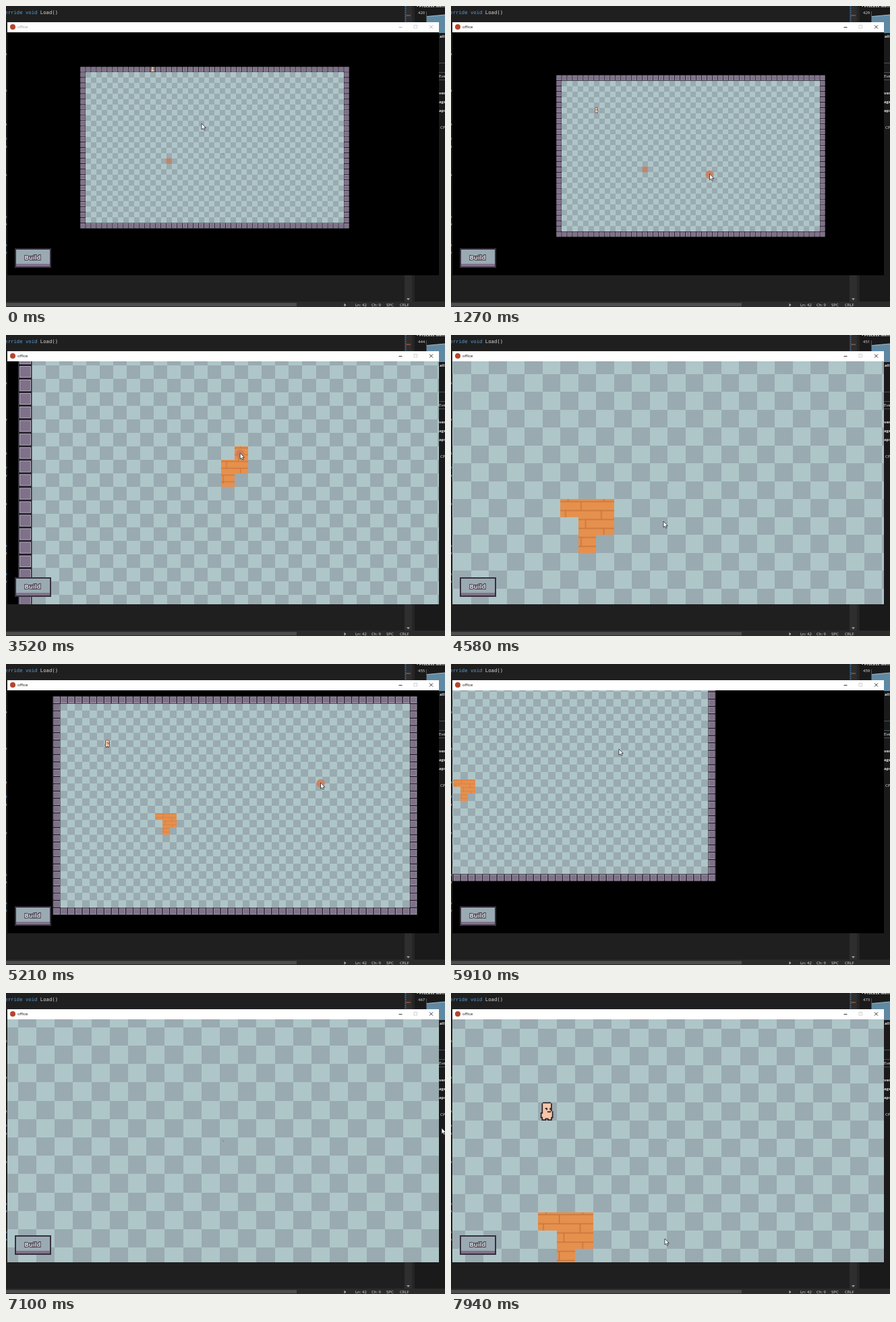
Recreate the animation shown at these times as an HTML page. Size 651 by 446 pixels, loop 8000 ms.

```html
<!DOCTYPE html>
<html lang="en">
<head>
<meta charset="utf-8">
<title>office</title>
<style>
  html, body { margin: 0; width: 100%; height: 100%; overflow: hidden; background: #1f1f1f; }
  svg { display: block; width: 651px; height: 446px; }
  text { font-family: "Open Sans", "Noto Sans", sans-serif; font-size: 6px; fill: #e4e4e4; }
  .code { font-family: "DejaVu Sans Mono", monospace; font-size: 7.27px; fill: #d8d8d8; white-space: pre; }
  .bold { font-weight: 700; }
  .build { font-size: 9.4px; font-weight: 700; fill: #dde1e4; stroke: #403a48; stroke-width: 2px; paint-order: stroke; text-anchor: middle; }
</style>
</head>
<body>
<svg viewBox="0 0 651 446" xmlns="http://www.w3.org/2000/svg">
  <defs>
    <clipPath id="view"><rect x="2" y="39" width="640" height="360"/></clipPath>
    <pattern id="planks" width="2" height="2" patternUnits="userSpaceOnUse">
      <rect width="2" height="2" fill="#e6904e"/>
      <path d="M0 .13H2M0 .63H2M0 1.13H2M0 1.63H2M.42 0V.13M.42 1.63V2M1.15 .13V.63M.28 .63V1.13M1.4 1.13V1.63"
            stroke="#c9743a" stroke-width=".055" fill="none"/>
    </pattern>
  </defs>

  <!-- editor behind the window -->
  <rect width="651" height="446" fill="#1f1f1f"/>
  <text class="code" x="-1.7" y="12"><tspan fill="#569cd6">erride void</tspan> Load()</text>
  <path d="M.7 70v3M.7 124v3M.7 174v3M.7 207v3M.7 249v3M.7 322v3" stroke="#8a8a8a"/>
  <path d="M.7 195v3M.7 311v3M.7 353v3M.7 364v3" stroke="#4a80ad"/>
  <rect x="591" width="11" height="438" fill="#2e2e2e"/>
  <path d="M592.500 0V24" stroke="#3c6287" stroke-width="2" stroke-dasharray="2 1"/>
  <rect x="593" y="13" width="7" height="2" fill="#7a4b36"/>
  <path d="M594 433h5l-2.500 3z" fill="#a0a0a0"/>
  <rect x="602" width="4" height="438" fill="#252526"/>
  <rect x="606" width="45" height="438" fill="#1a1a1b"/>
  <rect y="438" width="651" height="8" fill="#2b2b2b"/>
  <rect y="440" width="431" height="5" fill="#4d4d4d"/>
  <path d="M501.500 440.500v5l3-2.500z" fill="#b0b0b0"/>
  <text x="518" y="445">Ln: 42</text>
  <text x="542" y="445">Ch: 9</text>
  <text x="564" y="445">SPC</text>
  <text x="584" y="445">CRLF</text>

  <!-- memory panel -->
  <text class="bold" x="609" y="2">▪ Process Memory</text>
  <text id="mem" x="611" y="12"></text>
  <path d="M624 15.500L651 13V40H624Z" fill="#5f89a3"/>
  <path d="M624 15.500L651 13" stroke="#c3d3dc" stroke-width=".8"/>
  <path d="M623.500 8V40" stroke="#777" stroke-width=".6"/>
  <path d="M642 84.500h9M642 98.500h9M642 109.500h9" stroke="#51636f" stroke-width=".8"/>
  <text class="bold" x="643" y="47">all</text>
  <text x="642" y="106" fill="#aaa">Eve</text>
  <text class="bold" x="642" y="131">ver</text>
  <text class="bold" x="642" y="144">age</text>
  <text class="bold" x="642" y="157">aps</text>
  <text x="644" y="182">CP</text>

  <!-- game window -->
  <rect x="2" y="24" width="640" height="15" fill="#fff"/>
  <circle cx="10" cy="31" r="4" fill="#b5452c"/>
  <text id="title" x="17" y="33">office</text>
  <path id="buttons" d="M582.500 31.500h5M628 28.500l5 5m0-5l-5 5" fill="none" stroke-width=".9"/>
  <rect x="605" y="28.500" width="4.500" height="4.500" fill="none" stroke="#c8c8c8" stroke-width=".8"/>
  <rect x="2" y="39" width="640" height="360" fill="#000"/>
  <g clip-path="url(#view)">
    <g id="world">
      <rect width="50" height="30" fill="#aec6c8"/>
      <path id="dark" fill="#9aaab1" shape-rendering="crispEdges"/>
      <path id="wallBase" fill="#211b27"/>
      <path id="wallRim" fill="#b3aebb"/>
      <path id="wallFace" fill="#80718a"/>
      <path id="wood" fill="url(#planks)" shape-rendering="crispEdges"/>
      <rect id="muted" x="16" y="17" width="1" height="1" fill="#c0866b"/>
      <g id="person">
        <path d="M4 0H11V1H12V8H13V14H12V16H8V15H7V16H3V14H2V9H3V1H4Z" fill="#2c2427"/>
        <path d="M4 1H11V8H12V13H11V15H9V14H6V15H4V13H3V10H4Z" fill="#f6c5a9"/>
        <path d="M6 5H8V7H7V6H6ZM10 5H11V7H10ZM8 8H11V9H8Z" fill="#2c2427"/>
      </g>
    </g>
    <circle cx="322" cy="219" r=".8" fill="#6b7378"/>
    <rect x="14" y="360" width="52" height="27" fill="#9aaab2" stroke="#37303f" stroke-width="2"/>
    <rect x="15" y="382" width="50" height="4" fill="#80718a"/>
    <text class="build" x="39.500" y="376">Build</text>
  </g>

  <circle id="press" r="6.300" fill="#cf7b58" opacity=".85"/>
  <path id="cursor" d="M0 0V9L2.100 7.200L3.600 10.200L5.100 9.500L3.700 6.600H6.400Z" fill="#fff" stroke="#22262a" stroke-width=".8"/>
</svg>
<script>
const LOOP = 8000, COLS = 50, ROWS = 30, MID_X = 322, MID_Y = 219, ZOOM_TIME = 140;
const $ = id => document.getElementById(id);
const show = (id, on) => $(id).style.display = on ? "" : "none";
const place = (id, x, y, scale = 1) =>
  $(id).setAttribute("transform", `translate(${x} ${y}) scale(${scale})`);

// Tiles laid one after another; the first is there from the start.
const tiles = [[16, 17], [15, 18], [15, 17], [16, 16], [15, 16], [14, 16]];
const laidAt = i => i ? 2900 + 200 * i : 0;

// Each drag moves the pointer from one point to another and the map with it.
const drags = [
  { from: 560, to: 2080, path: [[337.5, 236], [360, 274], [387, 245], [406, 251], [428.7, 215.8]] },
  { from: 4020, to: 4400, path: [[412.8, 203.4], [315, 276]] },
  { from: 5100, to: 5880, path: [[502.6, 184.1], [249, 126]] },
  { from: 6450, to: 7040, path: [[249, 126], [638.5, 215.2]] },
  { from: 7400, to: 7920, path: [[96.7, 226], [317, 364]] }
];
const zooms = [[2180, 20.05], [4400, 26.5], [4720, 10.8], [6060, 27.2]];
const walk = [[70, 13, 0], [320, 10.1, 3], [520, 10.1, 3], [1270, 7, 6], [7150, 7, 6], [7900, 14, 10]];

function at(keys, t) {
  const i = keys.findIndex(k => k[0] > t);
  if (i === 0) return keys[0].slice(1);
  if (i < 0) return keys[keys.length - 1].slice(1);
  const a = keys[i - 1], b = keys[i], p = (t - a[0]) / (b[0] - a[0]);
  return a.slice(1).map((v, j) => v + (b[j + 1] - v) * p);
}

const zoomAt = t => zooms.reduce((size, [start, next]) => {
  const p = Math.min(1, Math.max(0, (t - start) / ZOOM_TIME));
  return size * (next / size) ** p;
}, 7.98);

function cameraAt(t) {
  let x = 26.57, y = 16.17;
  for (const { from, to } of drags) {
    if (t < from) break;
    const [x0, y0] = at(pointer, from), [x1, y1] = at(pointer, Math.min(t, to));
    const size = zoomAt(from);
    x -= (x1 - x0) / size;
    y -= (y1 - y0) / size;
  }
  return [x, y, zoomAt(t)];
}

// The pointer rests, drags, or visits the middle of each tile being laid.
const pointer = [
  [70, 290, 174], [320, 325, 252], [520, 325, 252], [2310, 326, 218], [3030, 326, 218],
  [4720, 315, 276], [7100, 646, 200], [7200, 646, 200]
];
for (const { from, to, path } of drags)
  path.forEach((p, i) => pointer.push([from + (to - from) * i / (path.length - 1), ...p]));
pointer.sort((a, b) => a[0] - b[0]);
const [buildX, buildY, buildSize] = cameraAt(3030);
tiles.slice(1).forEach(([col, row], i) => pointer.push([
  laidAt(i + 1),
  MID_X + (col + 0.5 - buildX) * buildSize,
  MID_Y + (row + 0.5 - buildY) * buildSize
]));
pointer.sort((a, b) => a[0] - b[0]);

const box = (x, y, inset = 0) => {
  const s = 1 - 2 * inset;
  return `M${x + inset} ${y + inset}h${s}v${s}h${-s}z`;
};

function buildRoom() {
  const d = { dark: "", wallBase: "", wallRim: "", wallFace: "" };
  for (let y = 0; y < ROWS; y++) for (let x = 0; x < COLS; x++) {
    if (x % (COLS - 1) && y % (ROWS - 1)) {
      if ((x + y) % 2 === 0) d.dark += box(x, y);
    } else {
      d.wallBase += box(x, y);
      d.wallRim += box(x, y, 0.07);
      d.wallFace += box(x, y, 0.12);
    }
  }
  for (const id in d) $(id).setAttribute("d", d[id]);
}

function draw(t) {
  const [cx, cy, size] = cameraAt(t);
  place("world", MID_X - cx * size, MID_Y - cy * size, size);
  place("person", ...at(walk, t), 1 / 16);

  $("wood").setAttribute("d", tiles.filter((_, i) => t >= laidAt(i)).map(p => box(...p)).join(""));
  show("muted", size < 8);

  const [px, py] = at(pointer, t);
  place("cursor", px, py);
  place("press", px, py + 1);
  const building = t >= laidAt(1) && t < laidAt(tiles.length - 1);
  show("press", building || drags.some(d => t >= d.from && t < d.to));

  const active = t >= drags[0].from;
  $("title").style.fill = active ? "#111" : "#999";
  $("buttons").style.stroke = active ? "#222" : "#aaa";
  $("mem").textContent = Math.floor(420.9 + t * 0.00658);
}

function tick() {
  draw(performance.now() % LOOP);
  requestAnimationFrame(tick);
}
buildRoom();
tick();
</script>
</body>
</html>
```
